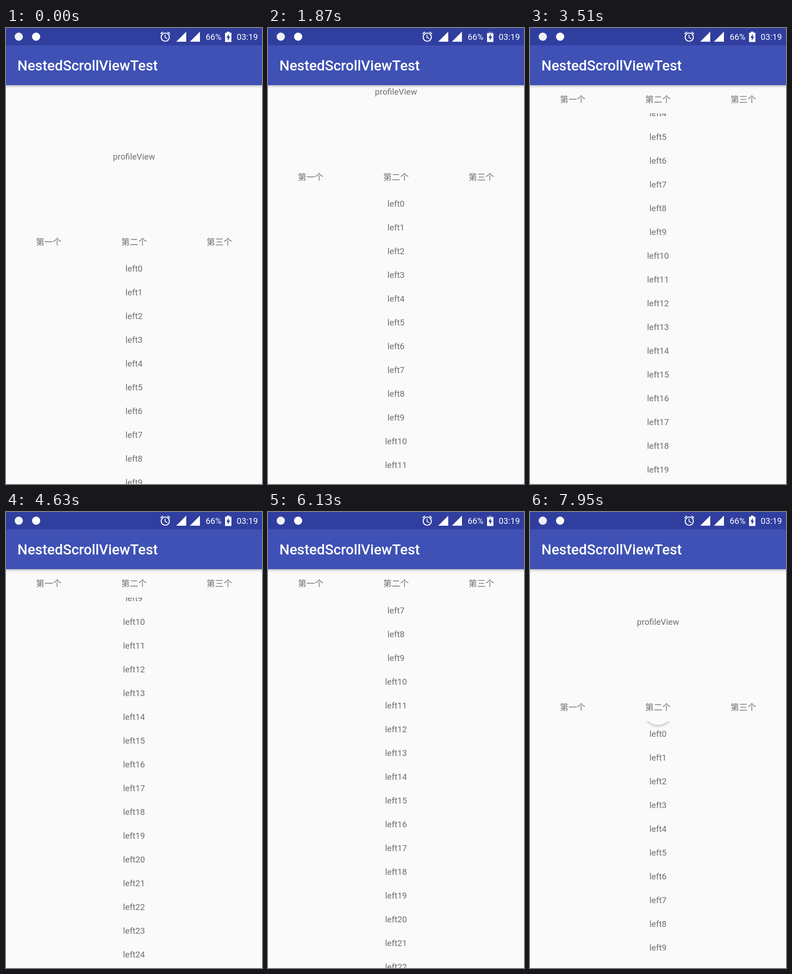
These frames come from a looping animation (561x998 px, 8 s). An HTML page with a canvas:

```html
<!DOCTYPE html>
<html lang="en">
<head>
<meta charset="utf-8">
<title>Nested scrolling</title>
<style>
  html, body { margin: 0; width: 100%; height: 100%; overflow: hidden; background: #fafafa; }
  canvas { display: block; width: 561px; height: 998px; }
</style>
</head>
<body>
<canvas id="stage" width="561" height="998"></canvas>
<script>
const ctx = document.getElementById('stage').getContext('2d');
const W = 561, H = 998, LOOP = 8000;
const BAR_BOTTOM = 125, HEADER = 312, ROW = 52;
const INK = '#707070', PAPER = '#fafafa', STATUS = '#303f9f';
const FACE = 'Roboto, "Noto Sans CJK SC", "Noto Sans CJK", sans-serif';

// [time, total scroll]; the header takes the first 312 px, the list the rest
const keys = [
  [1080, 0], [1870, 142], [3510, 548], [4630, 806], [5050, 815],
  [5240, 815], [5520, 762], [6790, 561], [7950, 41], [8000, 41]
];

const clamp = (v, a, b) => Math.min(b, Math.max(a, v));
const rate = i => (keys[i + 1][1] - keys[i][1]) / (keys[i + 1][0] - keys[i][0]);

// Monotone slope at a key: harmonic mean of its two neighbours
function slope(i) {
  if (i === 0 || i === keys.length - 1) return 0;
  const a = rate(i - 1), b = rate(i);
  if (a * b <= 0) return i === 7 ? a : 0;
  return 2 * a * b / (a + b);
}

function scrollAt(t) {
  if (t <= keys[0][0]) return 0;
  let i = 0;
  while (i < keys.length - 2 && t >= keys[i + 1][0]) i++;
  const [t0, y0] = keys[i], [t1, y1] = keys[i + 1];
  const d = t1 - t0, u = clamp((t - t0) / d, 0, 1), v = 1 - u;
  return y0 * (1 + 2 * u) * v * v + slope(i) * d * u * v * v
       + y1 * u * u * (3 - 2 * u) - slope(i + 1) * d * u * u * v;
}

// The picture rests for 100 ms in every 840 ms
function withRests(t) {
  const base = t < 5100 ? 1870 : 5990;
  const phase = ((t - base) % 840 + 840) % 840;
  return phase < 100 ? t - phase : t;
}

function text(str, x, y, color = INK, align = 'center', font = '18.7px ') {
  ctx.font = font + FACE;
  ctx.fillStyle = color;
  ctx.textAlign = align;
  ctx.fillText(str, x, y);
}

function rect(x, y, w, h, color) {
  ctx.fillStyle = color;
  ctx.fillRect(x, y, w, h);
}

function disc(x, y, r, color) {
  ctx.fillStyle = color;
  ctx.beginPath();
  ctx.arc(x, y, r, 0, Math.PI * 2);
  ctx.fill();
}

function poly(points, color) {
  ctx.fillStyle = color;
  ctx.beginPath();
  points.forEach(([x, y]) => ctx.lineTo(x, y));
  ctx.fill();
}

function line(points, width) {
  ctx.strokeStyle = '#fff';
  ctx.lineWidth = width;
  ctx.beginPath();
  points.forEach(([x, y]) => ctx.lineTo(x, y));
  ctx.stroke();
}

function alarm(x, y) {
  ctx.strokeStyle = '#fff';
  ctx.lineWidth = 2.2;
  ctx.beginPath();
  ctx.arc(x, y + 1, 9, 0, Math.PI * 2);
  ctx.stroke();
  line([[x - 0.5, y - 4.5], [x - 0.5, y + 1.5], [x + 4.5, y + 4.5]], 1.8);
  line([[x - 10.5, y - 6], [x - 5, y - 10.5]], 2.2);
  line([[x + 10.5, y - 6], [x + 5, y - 10.5]], 2.2);
}

function batteryShape() {
  ctx.beginPath();
  ctx.rect(484, 8, 6, 4);
  ctx.rect(480, 10.5, 14, 20);
  ctx.fill();
}

function battery(t) {
  const phase = t % 4000;
  const level = phase < 920 || phase >= 3100 ? 1 : phase < 1700 ? 0.71 : 0.85;
  ctx.fillStyle = 'rgba(255,255,255,.35)';
  batteryShape();
  ctx.save();
  ctx.beginPath();
  ctx.rect(478, 30.5 - 22.5 * level, 18, 24);
  ctx.clip();
  ctx.fillStyle = '#fff';
  batteryShape();
  ctx.restore();
  poly([[488.2, 13], [483, 21.5], [486, 21.5], [486, 27.5], [491.2, 19], [488.2, 19]], STATUS);
}

function topBars(t) {
  const shade = ctx.createLinearGradient(0, BAR_BOTTOM, 0, BAR_BOTTOM + 7);
  shade.addColorStop(0, 'rgba(0,0,0,.27)');
  shade.addColorStop(0.4, 'rgba(0,0,0,.1)');
  shade.addColorStop(1, 'rgba(0,0,0,0)');
  rect(0, BAR_BOTTOM, W, 7, shade);
  rect(0, 0, W, BAR_BOTTOM, '#3f51b5');
  rect(0, 0, W, 38, STATUS);

  disc(28, 19, 9, '#f0f1f8');
  disc(66, 19, 9, '#fff');
  alarm(349, 19);
  for (const x of [373, 403]) poly([[x, 30], [x + 22, 8], [x + 22, 30]], '#fff');
  text('66%', 437.5, 26, '#fff', 'left');
  battery(t);
  text('03:19', 552, 26, '#fff', 'right');
  text('NestedScrollViewTest', 25, 93, '#fff', 'left', '500 31.17px ');
}

function list(top, inner, pull) {
  ctx.save();
  ctx.beginPath();
  ctx.rect(0, top, W, H - top);
  ctx.clip();
  const first = Math.max(0, Math.floor(inner / ROW) - 1);
  for (let i = first; ; i++) {
    const y = top + 33.5 + i * ROW - inner;
    if (y > H + 20) break;
    text('left' + i, 280.5, y);
  }
  if (pull > 0) {
    ctx.shadowColor = 'rgba(0,0,0,.28)';
    ctx.shadowBlur = 6;
    ctx.shadowOffsetY = 2;
    disc(280.5, top + pull - 31, 31, PAPER);
  }
  ctx.restore();
}

function draw(t) {
  const s = Math.round(scrollAt(withRests(t)));
  const shift = Math.min(s, HEADER);
  // The refresh disc peeks out at the end of the downward pull
  const pull = t > 5240 ? 8 * clamp((120 - s) / 79, 0, 1) : 0;

  rect(0, 0, W, H, PAPER);
  text('profileView', 280.5, 288 - shift);
  ['第一个', '第二个', '第三个'].forEach((name, i) =>
    text(name, 93.5 + 187 * i, 475 - shift));
  list(499 - shift, s - shift, pull);
  topBars(t);
}

const start = performance.now();
function tick() {
  draw((performance.now() - start) % LOOP);
  requestAnimationFrame(tick);
}
tick();
</script>
</body>
</html>
```
